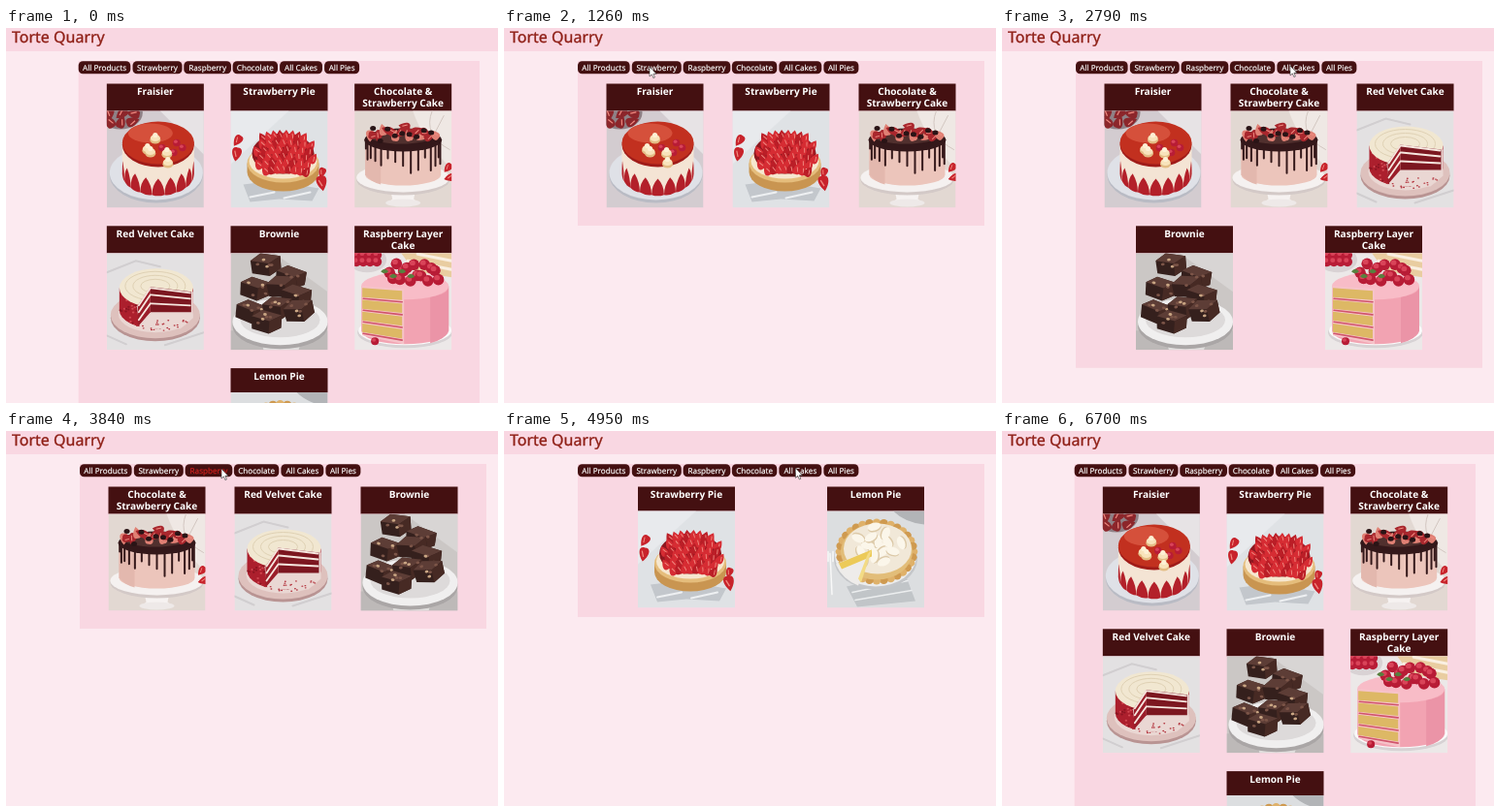
Recreate the animation shown at these times as an HTML page. Size 507 by 387 pixels, loop 7410 ms.

```html
<!DOCTYPE html>
<html lang="en">
<head>
<meta charset="utf-8">
<title>Torte Quarry</title>
<style>
html, body { margin: 0; width: 100%; height: 100%; overflow: hidden; background: #fceaf0; }
svg { display: block; font-family: "Noto Sans", "Open Sans", sans-serif; text-rendering: geometricPrecision; }
.title { font-size: 16px; fill: #8f1f16; stroke: #8f1f16; stroke-width: .3px; }
.btn { font-size: 8.1px; text-anchor: middle; stroke-width: .15px; }
.name { font-size: 10.1px; font-weight: 700; text-anchor: middle; fill: #fff; }
</style>
</head>
<body>
<svg id="stage" width="507" height="387" viewBox="0 0 507 387"></svg>
<script>
const LOOP = 7410, DARK = '#441011', PANEL = '#f9d7e2';

// Drawing helpers, all returning SVG markup
const ell = (x, y, rx, ry, fill, more = '') => `<ellipse cx="${x}" cy="${y}" rx="${rx}" ry="${ry}" fill="${fill}" ${more}/>`;
const path = (d, fill, more = '') => `<path d="${d}" fill="${fill}" ${more}/>`;
const line = (d, color, width) => path(d, 'none', `stroke="${color}" stroke-width="${width}" stroke-linecap="round"`);
const box = (x, y, w, h, fill, r = 0) => `<rect x="${x}" y="${y}" width="${w}" height="${h}" rx="${r}" fill="${fill}"/>`;
const many = (n, f) => Array.from({ length: n }, (_, i) => f(i)).join('');
const rand = i => { const v = Math.sin(i * 12.9898) * 43758.5453; return v - Math.floor(v); };
const drum = (x, y, rx, ry, h, fill) => path(`M${x - rx} ${y}v${h}a${rx} ${ry} 0 0 0 ${2 * rx} 0v${-h}z`, fill);
const berry = (x, y, s, turn = 0, color = '#c8232b') =>
  `<g transform="translate(${x} ${y}) rotate(${turn}) scale(${s})">` +
  path('M0-6C5-7 6-1 0 6C-6-1-5-7 0-6', color) + path('M-2-3L0 2', 'none', 'stroke="#f08a80"') + '</g>';
const raspberry = (x, y, r) => ell(x, y, r, r, '#b81c36') + ell(x - r / 4, y - r / 3, r / 2, r / 2.2, '#d94459');
const rosette = (x, y) => ell(x, y + 2, 5.5, 4, '#e3bd85') + ell(x, y, 5, 3.6, '#f8e3bb') + ell(x, y - 3, 2.6, 2.6, '#fdf0d4');

function brick(x, y, turn, w = 31, h = 15) {
  return `<g transform="translate(${x} ${y}) rotate(${turn})">` +
    path(`M0 5L${w * .35}-2L${w} 2V${h}L${w * .6} ${h + 7}L1 ${h + 3}z`, '#35201d') +
    path(`M0 5L${w * .35}-2L${w} 2L${w * .6} 9z`, '#5d3d36') +
    path(`M${w * .6} 9L${w} 2V${h}L${w * .6} ${h + 7}z`, '#472a24') +
    many(5, i => ell(4 + rand(x + i) * (w - 8), 2 + rand(y + i * 3) * (h + 1), 1.9, 1.4, i % 2 ? '#c9a583' : '#7c5548')) + '</g>';
}

function fraisier() {
  return box(0, 0, 100, 100, '#d3ccd0') + path('M55 0H100V45Z', '#e7e3e5') +
    ell(14, 2, 23, 17, '#8f8186') + many(6, i => berry(3 + i % 3 * 12, 3 + (i / 3 | 0) * 8, 1.15, i * 50, '#8c262b')) +
    ell(51, 66, 48, 29, '#b9bbc4') + ell(51, 64, 48, 28, '#dfe1e7') +
    drum(53, 34, 37, 22, 31, '#f4e4d4') +
    many(9, i => {
      const at = k => [53 - 37 * Math.cos(Math.PI * k / 9), 65 + 22 * Math.sin(Math.PI * k / 9)];
      const [x0, y0] = at(i), [x, y] = at(i + .5), [x1, y1] = at(i + 1);
      return path(`M${x0} ${y0}Q${x0} ${y0 - 10} ${x} ${y - 17}Q${x1} ${y1 - 10} ${x1} ${y1}Q${x} ${y + 2} ${x0} ${y0}`, '#b3202a');
    }) +
    ell(53, 35, 37, 23, '#a01c19') + ell(53, 33, 37, 22, '#c2301f') + ell(45, 23, 23, 10, '#d5503b') +
    [[57, 38], [69, 43], [72, 33], [78, 38]].map(([x, y]) => raspberry(x, y, 3.8)).join('') +
    [[42, 39], [50, 28], [45, 42], [62, 43], [63, 53]].map(p => rosette(...p)).join('');
}

function strawberryPie() {
  return box(0, 0, 100, 100, '#dfe2e5') + path('M0 0H60L0 55Z', '#e8eaed') +
    path('M13 76L45 72L91 80L84 93L50 91L20 94Z', '#c3c7cc') + line('M20 89L45 84M55 90L82 84', '#eef0f2', 2) +
    drum(54, 54, 37, 20, 9, '#c99551') + ell(54, 54, 37, 20, '#e5bd7c') + ell(54, 52, 35, 18, '#f6e7cf') +
    ell(54, 44, 32, 21, '#8e1820') +
    many(6, r => many(8, c => {
      const u = (c - 3.5 + r % 2 / 2) / 4.2, v = (r - 2.5) / 2.8;
      const x = 54 + u * 33 * Math.sqrt(1 - v * v * .5), y = 42 + v * 19 + u * u * 4;
      return berry(x, y, .95, 180 + u * 35, (r + c) % 3 ? '#d62c33' : '#bb1e27');
    })) +
    berry(7, 31, 1.05, 35) + berry(6, 45, 1.2, 10) + berry(94, 64, .9, 20) + berry(94, 75, 1.3, -10);
}

function chocolateCake() {
  return box(0, 0, 100, 100, '#e2d8d2') + path('M60 0H100V60Q70 30 60 0', '#efe8e4') +
    line('M80 0Q70 25 98 40M92 5L78 32', '#d2c6c0', 1) +
    path('M36 76H64L61 91Q68 96 50 97Q32 96 39 91Z', '#f6f2f1') + ell(50, 95, 18, 4, '#eee9e8') +
    ell(50, 71, 48, 16, '#d3c9c7') + ell(50, 69, 48, 15, '#f5f1f0') +
    drum(50, 31, 39, 11, 35, '#ecc5bb') + path('M11 33V66Q18 74 27 76V42Z', '#e3b8ae') +
    many(15, i => {
      const a = Math.PI * (i + .5) / 15;
      return line(`M${50 - 38.5 * Math.cos(a)} ${30 + 10 * Math.sin(a)}v${7 + rand(i + 2) * 18}`, '#34181a', 2);
    }) +
    ell(50, 30, 40, 12, '#34181a') + ell(48, 27, 31, 7, '#51302e') +
    many(16, i => berry(16 + i * 4.4, 22 + rand(i + 4) * 11 - 8 * Math.sin(i / 5), 1, rand(i) * 300, i % 3 ? '#a9272d' : '#e08074')) +
    many(9, i => ell(19 + i * 7.5, 18 + rand(i) * 14, 3, 2.5, '#2a1416')) + berry(96, 59, .9, 40) + berry(98, 69, 1, 75);
}

function redVelvet() {
  return box(0, 0, 100, 100, '#e3e1e2') + line('M0 20L30 8L55 14M60 95L100 82M0 85L20 94', '#d1ced0', 2) +
    ell(50, 67, 46, 24, '#b99493') + ell(50, 64, 46, 24, '#dec1bd') + ell(50, 63, 38, 19, '#ead7d3') +
    drum(51, 36, 38, 19, 23, '#ac1f2d') +
    many(70, i => {
      const u = rand(i + 1) * 2 - 1;
      return ell(51 + u * 37, 38 + rand(i + 70) * 22 + 18 * Math.sqrt(1 - u * u), 1.2, 1, i % 2 ? '#d24952' : '#8b1421');
    }) +
    ell(51, 36, 38, 20, '#f1e7d1') + many(3, i => ell(50, 34, 31 - i * 8, 15 - i * 4, 'none', 'stroke="#dfd1b4"')) +
    path('M45 35L89 40V67L76 78L34 78L31 55Z', '#ead7d3') +
    path('M45 35L87 40V61L45 61Z', '#7c1720') + path('M45 35L32 54V76L45 61Z', '#9b1d29') +
    line('M46 36L86 41M46 43L86 47M46 52L86 54M45 36L33 54M45 43L33 61M45 52L33 69', '#f6e7df', 1.8) +
    many(24, i => ell(28 + rand(i) * 55, 68 + rand(i + 33) * 12, 1, .7, '#b2303a'));
}

function brownie() {
  const pile = [[20, 3, -4], [48, 13, 9], [11, 25, 7], [36, 27, -9], [53, 33, 6], [7, 48, 10], [32, 48, -5], [53, 53, -12], [22, 60, 4]];
  return box(0, 0, 100, 100, '#cbc7c5') + path('M0 0H100V40L45 0Z', '#d8d5d4') + box(0, 80, 100, 20, '#bdb9b8') +
    path('M30 88H74L70 100H34Z', '#e0dedd') +
    ell(51, 75, 49, 24, '#aaa6a6') + ell(51, 71, 49, 24, '#f0efef') + ell(51, 69, 41, 18, '#dddada') +
    pile.map(p => brick(...p)).join('');
}

function raspberryCake() {
  return box(0, 0, 100, 100, '#ece8e8') + path('M48 0H100V25L62 19Z', '#e9cda1') +
    line('M55 8L100 17M65 1L100 8', '#faf0e2', 3) +
    ell(13, 7, 20, 13, '#d9d2d4') + many(8, i => raspberry(2 + i % 4 * 7, 2 + (i / 4 | 0) * 7, 5)) +
    ell(52, 82, 49, 16, '#d7d2d4') + ell(52, 80, 48, 15, '#fafafa') +
    drum(52, 34, 45, 14, 46, '#f2a3b2') + path('M78 45Q97 43 97 34V80Q94 89 78 93Z', '#eb94a7') +
    ell(52, 34, 45, 14, '#f8bcc7') +
    path('M7 34L51 37V94L8 85Z', '#f6c3c9') +
    many(4, i => path(`M8 ${36 + i * 12.2}L49 ${39 + i * 13.2}v9.5L8 ${45.5 + i * 12}z`, '#ddb865') +
      line(`M9 ${47 + i * 12}L49 ${50.5 + i * 13.1}`, '#d0546a', 1.6)) +
    many(15, i => raspberry(36 + i * 3.6, 20 + 9 * Math.sin(i * 2.4), 5.8)) +
    many(4, i => path(`M${27 + i * 9} ${19 + i % 2 * 5}q4-5 8 0q-4 4-8 0`, '#58803f')) + raspberry(21, 91, 4);
}

function lemonPie() {
  return box(0, 0, 100, 100, '#dcdee0') + path('M68 0H100V14Q80 12 68 0', '#b2b4b7') +
    path('M20 78L80 64L91 93L31 99Z', '#c1c5c8') + line('M26 84L83 72M29 92L87 82', '#eceeef', 1.5) +
    line('M3 44L5 86M1 42v10M6 42v10', '#f8f8f8', 1.5) +
    ell(50, 49, 43, 32, '#c4c6c9') + ell(50, 46, 42, 32, '#ececec') +
    many(32, i => ell(51 + 38 * Math.cos(i * Math.PI / 16), 42 + 30 * Math.sin(i * Math.PI / 16), 4.3, 4, i % 2 ? '#cf9a50' : '#dfb16a')) +
    ell(51, 42, 37, 29, '#e2bd79') + ell(52, 39, 35, 26, '#f1e8d8') +
    many(16, i => {
      const a = i * 2.4, r = 4 + i * 1.6;
      const x = 52 + r * Math.cos(a), y = 37 + r * .75 * Math.sin(a), turn = `transform="rotate(${i * 47} ${x} ${y})"`;
      return ell(x, y + 1.5, 7, 4, '#dcc9a8', turn) + ell(x, y, 7, 4, '#fbf6ea', turn);
    }) +
    path('M46 40L9 55Q15 70 32 77Z', '#eeecea') +
    path('M46 40L12 54L15 60L46 47Z', '#ecca58') + path('M46 40L35 74L32 70L42 44Z', '#f3db85');
}

const cakes = [
  [['Fraisier'], 'Strawberry, All Cakes', fraisier],
  [['Strawberry Pie'], 'Strawberry, All Pies', strawberryPie],
  [['Chocolate &amp;', 'Strawberry Cake'], 'Strawberry, Chocolate, All Cakes', chocolateCake],
  [['Red Velvet Cake'], 'Chocolate, All Cakes', redVelvet],
  [['Brownie'], 'Chocolate, All Cakes', brownie],
  [['Raspberry Layer', 'Cake'], 'Raspberry, All Cakes', raspberryCake],
  [['Lemon Pie'], 'All Pies', lemonPie]
].map(([lines, tags, art]) => ({ lines, tags, art }));

const buttons = [
  ['All Products', 74.7, 53.6], ['Strawberry', 130.5, 51], ['Raspberry', 183.3, 48.7],
  ['Chocolate', 233.6, 46.4], ['All Cakes', 282.1, 43.9], ['All Pies', 328.1, 36]
];

// Mouse presses: [down, up, button]
const clicks = [
  [1140, 1260, 'Strawberry'], [1840, 1970, 'All Products'], [2690, 2790, 'All Cakes'], [3300, 3400, 'Chocolate'],
  [3720, 3940, 'Raspberry'], [4570, 4720, 'All Pies'], [5480, 5600, 'All Products']
];

// Pointer moves: [start, end, x, y]
const moves = [
  [360, 920, 150, 40], [1440, 1690, 115, 39], [2150, 2640, 297, 39], [2840, 3240, 255, 37],
  [3460, 3650, 222, 39], [3960, 4390, 343, 38], [4790, 5380, 110, 40], [6250, 6700, 487, 280]
];

const stage = document.getElementById('stage');
stage.innerHTML = box(0, 0, 507, 387, '#fceaf0') + box(0, 0, 507, 24, PANEL) +
  '<text class="title" x="6" y="14.8">Torte Quarry</text>' +
  `<rect id="panel" y="34" fill="${PANEL}"/>` +
  '<g id="menu">' + buttons.map(([label, x, w]) =>
    box(x, 34.2, w, 13, DARK, 4.5) + `<text class="btn" x="${x + w / 2}" y="43.9">${label}</text>`).join('') + '</g>' +
  cakes.map(c => '<g class="card">' + box(0, 0, 100, 29, DARK) +
    c.lines.map((s, i) => `<text class="name" x="50" y="${11.7 + i * 12}">${s}</text>`).join('') +
    `<svg class="art" width="100" height="100">${c.art()}</svg></g>`).join('') +
  '<path id="pointer" d="M0 0V10L2.3 8L3.9 11.6L5.4 11L3.9 7.4H7Z" fill="#fff" stroke="#333" stroke-width=".6"/>';

const panel = document.getElementById('panel'), menu = document.getElementById('menu');
const pointer = document.getElementById('pointer');
const labels = [...menu.querySelectorAll('text')], cards = [...stage.querySelectorAll('.card')];
const set = (node, attrs) => Object.entries(attrs).forEach(([k, v]) => node.setAttribute(k, v));
let shown;

function layout(filter) {
  const all = filter === 'All Products';
  const center = all ? 281.5 : 285.5, width = all ? 383 : 390;
  const list = cakes.filter(c => all || c.tags.includes(filter));
  let bottom;
  cards.forEach(c => set(c, { display: 'none' }));
  for (let r = 0; r * 3 < list.length; r++) {
    const row = list.slice(r * 3, r * 3 + 3), cell = width / row.length;
    const tall = row.some(c => c.lines.length > 1), head = tall ? 28 : 25;
    const y = 57.5 + r * 146.8;
    row.forEach((cake, i) => {
      const card = cards[cakes.indexOf(cake)];
      const x = center - width / 2 + cell * (i + .5) - 50;
      set(card, { display: 'inline', transform: `translate(${x} ${y})` });
      set(card.firstChild, { height: head });
      set(card.querySelector('.art'), { y: head });
    });
    bottom = y + head + 100 + (tall ? 18.5 : 9.5);
  }
  set(panel, { x: all ? 74.7 : 76, width: all ? 413.3 : 419, height: bottom - 34 });
  set(menu, { transform: `translate(${all ? 0 : 1.3} 0)` });
}

function pointerAt(t) {
  let x = 405, y = 307;
  for (const [start, end, tx, ty] of moves) {
    const p = Math.min(1, Math.max(0, (t - start) / (end - start))), s = p * p * (3 - 2 * p);
    x += (tx - x) * s;
    y += (ty - y) * s;
  }
  return `translate(${x} ${y})`;
}

function draw(now) {
  const t = now % LOOP;
  const filter = clicks.reduce((f, [, up, name]) => t >= up ? name : f, 'All Products');
  const pressed = clicks.find(([down, up]) => t >= down && t < up);
  if (filter !== shown) layout(shown = filter);
  labels.forEach(l => {
    const color = pressed && l.textContent === pressed[2] ? '#d0211f' : '#fff';
    set(l, { fill: color, stroke: color });
  });
  set(pointer, { transform: pointerAt(t), display: t >= 360 && t < 6700 ? 'inline' : 'none' });
}

const begin = performance.now();
function tick() {
  draw(performance.now() - begin);
  requestAnimationFrame(tick);
}
tick();
</script>
</body>
</html>
```
